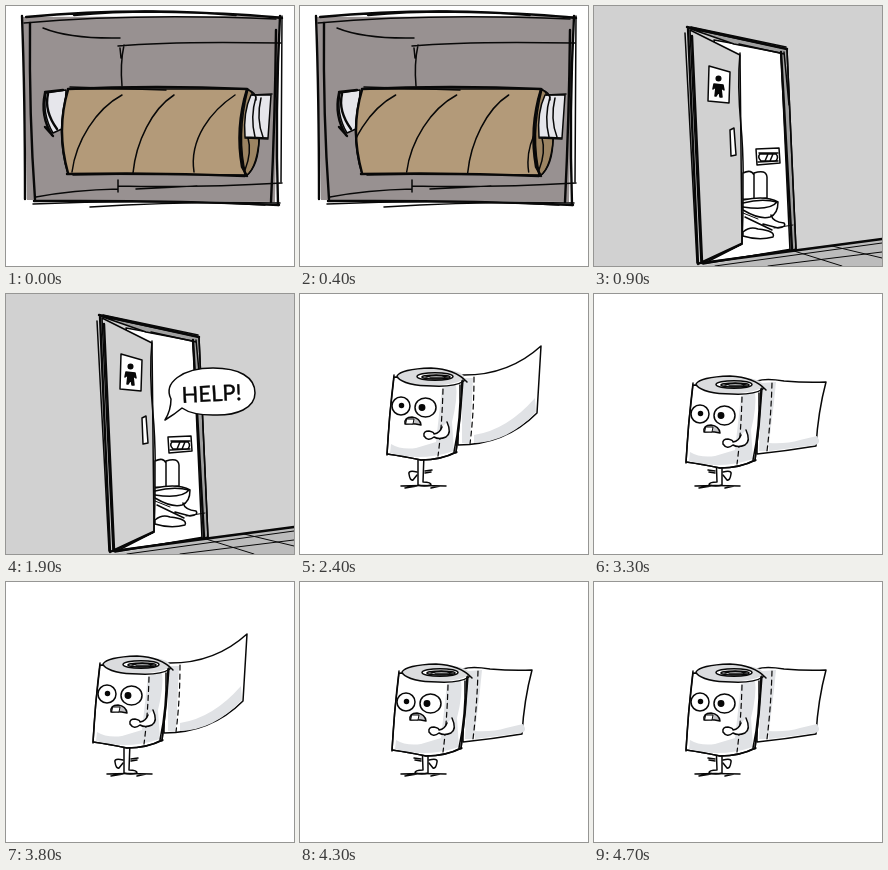
Animation, 288 px wide and 260 px high, one loop 4800 ms. Source, as an HTML page:

```html
<!DOCTYPE html>
<html lang="en">
<head>
<meta charset="utf-8">
<title>Out of paper</title>
<style>
  html, body { margin: 0; width: 100%; height: 100%; overflow: hidden; background: #fff; }
  svg { display: block; width: 100%; height: 100%; }
  path, ellipse, circle { fill: none; stroke: #080808; stroke-width: 1.5; stroke-linecap: round; stroke-linejoin: round; }
  .bold { stroke-width: 2.4; }
  .thin { stroke-width: 1; }
  .flat { stroke: none; }
  .wall { fill: #989191; }
  .card { fill: #b39a79; }
  .inside { fill: #9c8462; }
  .peg { fill: #e6e6eb; }
  .room { fill: #d1d1d1; }
  .floor { fill: #bcbcbc; }
  .frame { fill: #a1a1a1; }
  .shade { fill: #e0e2e5; stroke: none; }
  .top { fill: #dbdcde; }
  .mouth { fill: #c4c4c7; }
  .white { fill: #fff; }
  .ink { fill: #080808; }
  .dash { stroke-dasharray: 5 4; stroke-width: 1.2; }
  #runner { stroke-width: 1.3; }
  text { font: 22px Lato, "Open Sans", sans-serif; fill: #080808; stroke: #080808; stroke-width: .4; }
</style>
</head>
<body>
<svg viewBox="0 0 288 260" preserveAspectRatio="none">
  <defs>
    <clipPath id="tube"><path d="M62 83H241Q229 125 239 169L62 168Q49 126 62 83Z"/></clipPath>
  </defs>

  <g id="holder">
    <path class="wall flat" d="M17 11L273 10L269 196L21 194Z"/>
    <path class="bold" d="M16 10Q19 90 19 193M24 17Q23 110 29 193M20 11Q100 4 170 6T276 12M68 9Q145 2 230 9M28 195Q160 194 273 199"/>
    <path class="bold" d="M274 10Q269 105 272 199M270 24Q269 115 265 196"/>
    <path d="M276 10L275 176M18 17Q130 7 270 13M27 198Q140 193 259 199M84 201Q180 195 274 197"/>
    <path d="M37 22Q64 33 114 32M112 40Q165 35 275 37M118 39Q114 58 116 80M114 42L115 52"/>
    <path d="M30 191Q67 184 112 183M112 174V186M112 180Q190 182 276 177M130 183L191 180"/>
    <path class="peg" d="M40 87L60 84L58 122L47 127Q36 108 40 87Z"/>
    <path class="bold" d="M39 87Q34 110 46 129M42 88Q38 105 51 123M39 86L57 84M39 121L47 130"/>
    <path class="inside" d="M242 83Q252 90 254 124Q252 162 240 170Q230 130 242 83Z"/>
    <path class="peg" d="M245 89L265 89L262 132L239 131Q237 106 245 89Z"/>
    <path d="M250 91Q244 111 249 131M255 92Q250 113 257 131M246 89L266 88M239 132L262 133"/>
    <path d="M242 132Q246 146 239 164M253 132Q253 160 240 170"/>
    <path class="card" d="M62 83H241Q229 125 239 169L62 168Q49 126 62 83Z"/>
    <g clip-path="url(#tube)"><g id="spirals"></g></g>
    <path class="bold" d="M62 84Q50 124 62 167M62 83Q150 79 241 83Q229 122 236 161L241 170M61 168Q150 166 239 170"/>
    <path d="M64 81L160 84M242 84Q250 86 250 94M67 169L130 168"/>
  </g>

  <g id="restroom">
    <path class="room flat" d="M0 0H288V260H0Z"/>
    <path class="floor flat" d="M108 260L201 243L288 233V260Z"/>
    <path class="white" d="M120 34L187 46L198 243L109 258L148 238Z"/>
    <path class="frame" d="M94 22L193 43L202 243L196 245L187 47L140 38Z"/>
    <path class="room" d="M96 24L146 49L148 238L107 257Z"/>
    <path class="bold" d="M94 22L104 258M93 21Q130 29 193 43M98 30L108 255M187 46L198 243M104 258L147 238"/>
    <path d="M91 27L103 257M97 21L192 41M145 38L190 48M146 47Q143 78 147 120T148 237M193 43L202 244M190 46L195 99M108 257L198 244"/>
    <path class="bold" d="M108 257L190 246L288 233"/>
    <path class="thin" d="M121 260L288 237M200 245L248 260M238 240L288 252M174 260L288 246"/>
    <path class="white" d="M115 60L136 66L135 97L114 95Z"/>
    <circle class="ink" cx="124.500" cy="72.500" r="2.300"/>
    <path class="ink" d="M120 78L129 79L130 84L127 82L128 91L126 91L125 85L122 90L121 90L122 81L119 83Z"/>
    <path class="white" d="M136 124L140 122L142 149L137 150Z"/>
    <path class="white" d="M162 143L185 142L186 157L163 159Z"/>
    <path d="M165 147H184M164 156L184 155M166 148Q163 151 167 155H182Q185 151 182 148ZM171 155L174 148M176 155L179 148"/>
    <path class="white" d="M149 167Q157 163 160 169V194L149 193ZM160 167Q172 163 173 171V192L160 194Z"/>
    <path class="white" d="M149 204Q166 214 176 211Q184 208 184 196Q172 189 149 194Z"/>
    <path d="M149 197Q168 192 183 196Q176 205 149 201M177 209Q179 216 190 217Q193 221 184 222L169 218M151 211L178 224"/>
    <path class="white" d="M149 226Q156 220 164 223Q182 225 179 231Q165 235 149 230Z"/>
    <path class="thin" d="M180 222L199 219M149 207L164 213"/>
    <g id="bubble">
      <path class="white" d="M165 105C157 89 176 74 207 74C233 74 249 83 249 99C249 114 231 122 207 121C194 121 183 119 176 114Q169 120 159 126Q165 116 165 105Z"/>
      <text x="176" y="109" transform="rotate(-3 176 109)">HELP!</text>
    </g>
  </g>

  <g id="runner">
    <path id="sheet" class="white"/>
    <path id="sheetShade" class="shade"/>
    <path id="perforation" class="dash"/>
    <g id="legs">
      <path class="white" d="M122 160L123 188Q115 188 115 191Q122 193 128 191V160Z"/>
      <path d="M129 178Q138 176 137 180Q136 187 133 186L129 181M114 176L121 177M115 178L121 179"/>
    </g>
    <path d="M101 192Q119 191 146 192M105 194L117 192M131 194L140 192"/>
    <g id="body">
      <path class="white" d="M99 91Q94 130 92 168Q107 170 126 174Q146 174 161 166Q166 128 167 93Z"/>
      <path class="shade" d="M147 102L161 98Q163 112 157 136L159 165Q126 176 95 167L96 158Q106 164 121 162L141 156Z"/>
      <path d="M99 89Q94 130 92 169M92 168Q107 170 126 174Q146 174 162 166M168 94Q166 130 161 167M165 99Q166 132 159 166"/>
      <path class="dash" d="M148 103Q147 140 143 170"/>
      <ellipse class="top flat" cx="136" cy="91" rx="33" ry="8.500"/>
      <path d="M102 90Q106 83 136 82Q160 83 172 96M102 91Q110 100 138 100Q160 101 169 95"/>
      <ellipse class="white" cx="140" cy="90.500" rx="18" ry="3.800"/>
      <ellipse class="top" cx="141" cy="91" rx="14" ry="2"/>
      <path d="M131 91Q141 88 152 91M135 92H150"/>
      <circle class="white" cx="106" cy="120" r="9"/>
      <ellipse class="white" cx="130.500" cy="121.500" rx="10.500" ry="9.500"/>
      <circle class="ink" cx="106.500" cy="119.500" r="2"/>
      <circle class="ink" cx="127" cy="121.500" r="2.700"/>
      <path class="mouth" d="M110 138Q109 131 117 131Q125 132 126 139Q118 137 110 138Z"/>
      <path class="white thin" d="M112 133L119 133L118 138L111 138Z"/>
      <path class="white" d="M152 136Q157 147 151 151Q144 154 139 151Q133 156 129 150Q128 145 134 145Q139 146 139 148Q145 147 147 141"/>
    </g>
  </g>
</svg>
<script>
  const LOOP = 4800, STEP = 100;
  const part = id => document.getElementById(id);
  const show = (id, on) => part(id).style.display = on ? "" : "none";
  const move = (id, transform) => part(id).setAttribute("transform", transform);
  const shape = (id, d) => part(id).setAttribute("d", d);

  const seams = [
    "M116 89C90 103 70 135 66 166",
    "M168 89C146 103 130 136 127 167",
    "M229 89C205 105 183 133 188 166"
  ];
  part("spirals").innerHTML =
    seams.map(d => `<path d="${d}"/>`).join("") +
    `<path d="${seams[0]}" transform="translate(-61)"/>`;

  function drawRunner(lifted) {
    shape("sheet", lifted
      ? "M158 81Q207 83 241 52L237 119Q205 151 158 151Z"
      : "M163 87Q172 84 190 87Q213 89 232 88Q224 118 222 152Q192 157 163 160Z");
    shape("sheetShade", lifted
      ? "M162 84L173 84L170 150L162 149ZM174 141Q207 136 235 104L236 118Q208 148 174 149Z"
      : "M167 89L182 88L180 108L174 157L165 157ZM175 149Q193 150 206 146L223 142Q228 150 221 151L175 157Z");
    shape("perforation", lifted ? "M174 83Q174 118 170 150" : "M178 89Q177 124 173 157");
    move("body", lifted ? "translate(-5 -8)" : "");
    move("legs", lifted ? "translate(246) scale(-1 1)" : "");
  }

  function render(time) {
    const step = Math.floor(time % LOOP / STEP);
    const even = step % 2 === 0;
    show("holder", step < 9);
    show("restroom", step >= 9 && step < 24);
    show("bubble", step >= 11);
    show("runner", step >= 24);
    move("spirals", `translate(${Math.min(step, 6) % 6 * 61 / 6})`);
    move("bubble", even && step < 23 ? "translate(-1 0) rotate(-1 205 99)" : "");
    drawRunner(even);
  }

  const start = performance.now();
  function tick() {
    render(performance.now() - start);
    requestAnimationFrame(tick);
  }
  tick();
</script>
</body>
</html>
```
